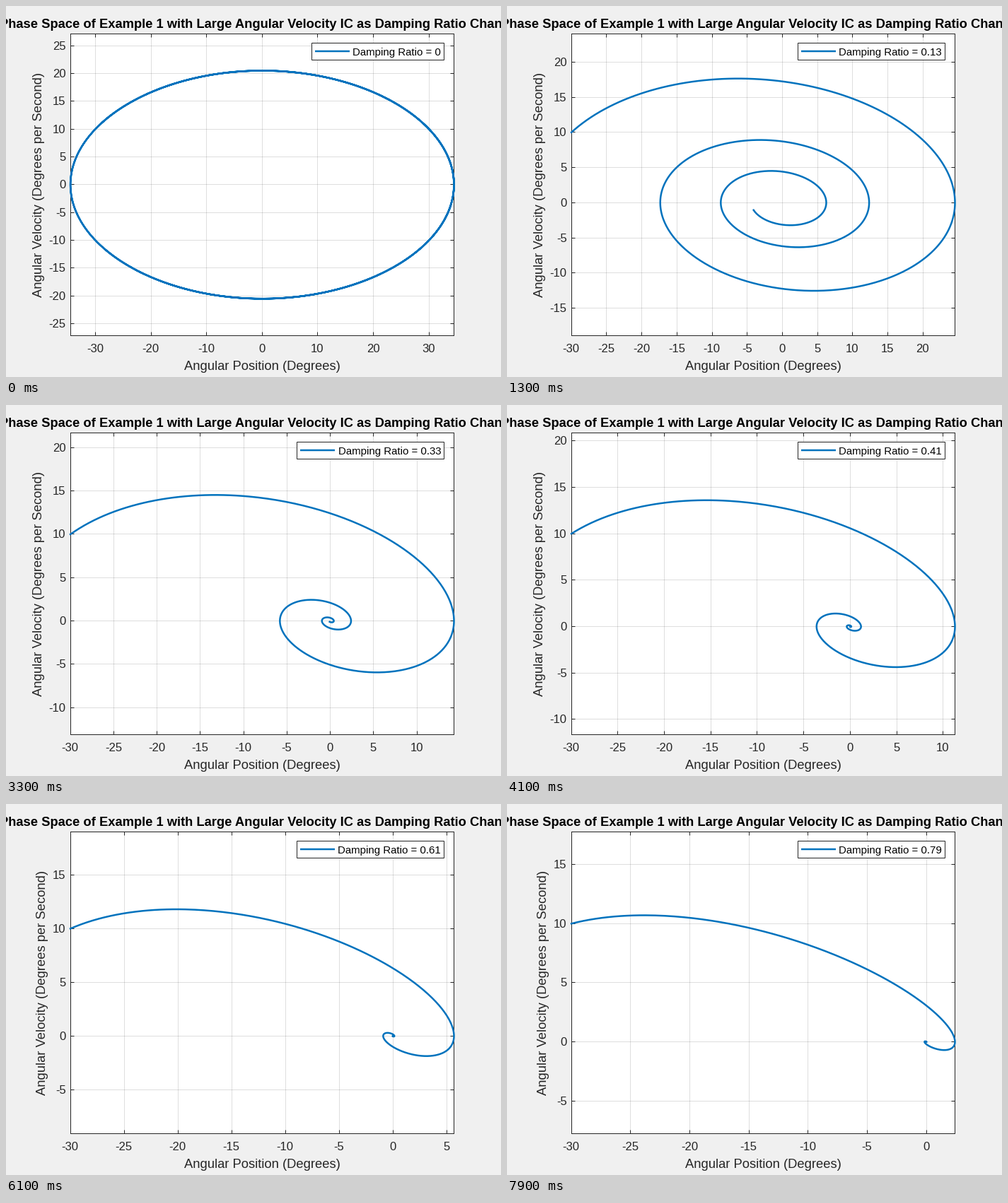
Write a matplotlib script that moves like this. It is 700 by 525 pixels and loops after 8 s.

```python
import numpy as np
import matplotlib.pyplot as plt
from matplotlib.animation import FuncAnimation
from matplotlib.lines import Line2D
from matplotlib.patches import Rectangle
from matplotlib.ticker import FuncFormatter, MultipleLocator
from matplotlib.transforms import Affine2D

W, H, DPI = 700, 525, 100
FRAMES, INTERVAL = 80, 100
LEFT, RIGHT, TOP, BOTTOM = 90.6, 633, 38.6, 466.1   # plot box in pixels
K = 0.365               # gravity over length
T_END, STEPS = 30, 1200
INK, BLUE = "#262626", "#0072BD"
PX = 72 / DPI           # one pixel in points

plt.rcParams["font.family"] = "Liberation Sans"


def slope(state, damping):
    x, v = state
    return np.array([v, -damping * v - K * np.sin(x)])


def integrate(damping):
    """Phase paths of the damped pendulum, one column per damping value."""
    h = T_END / STEPS
    s = np.radians(np.array([np.full_like(damping, -30), np.full_like(damping, 10)]))
    path = [s]
    for _ in range(STEPS):
        a = slope(s, damping)
        b = slope(s + h / 2 * a, damping)
        c = slope(s + h / 2 * b, damping)
        d = slope(s + h * c, damping)
        s = s + h / 6 * (a + 2 * b + 2 * c + d)
        path.append(s)
    return np.degrees(np.array(path))


ratios = np.arange(FRAMES) / 100
paths = integrate(ratios)

fig = plt.figure(figsize=(W / DPI, H / DPI), dpi=DPI, facecolor="#F0F0F0")
ax = fig.add_axes([LEFT / W, 1 - BOTTOM / H, (RIGHT - LEFT) / W, (BOTTOM - TOP) / H])
ax.set_axisbelow(True)
ax.grid(color=INK, alpha=0.15, lw=PX)
ax.tick_params(direction="in", top=True, right=True, length=5.4 * PX, width=PX,
               color=INK, labelcolor=INK, labelsize=16.67 * PX)
ax.tick_params(axis="x", pad=12 * PX)
ax.tick_params(axis="y", pad=6 * PX)
for spine in ax.spines.values():
    spine.set(color=INK, linewidth=PX)
for axis in (ax.xaxis, ax.yaxis):
    axis.set_major_formatter(FuncFormatter(lambda value, _: f"{value:.0f}"))
ax.yaxis.set_major_locator(MultipleLocator(5))

# Half a pixel aligns the smooth curve with the snapped grid
curve, = ax.plot([], [], color=BLUE, lw=2.5 * PX, zorder=3, clip_on=False,
                 transform=ax.transData + Affine2D().translate(0.5, -0.5))


def label(x, y, text, size, **style):
    """Text on the figure, placed in pixels from the top left."""
    style = {"ha": "center", "va": "baseline", "color": INK, **style}
    return fig.text(x / W, 1 - y / H, text, fontsize=size * PX, **style)


label(362.5, 31, "Phase Space of Example 1 with Large Angular Velocity IC "
      "as Damping Ratio Changes", 18.33, weight="bold", color="black")
label(362.75, 515, "Angular Position (Degrees)", 18.33)
y_label = label(50, 252.5, "Angular Velocity (Degrees per Second)", 18.33,
                rotation=90, rotation_mode="anchor")

# Legend, drawn in pixels
box = Rectangle((411, H - 76), 208, 24, fc="white", ec=INK, lw=PX,
                transform=None, zorder=5)
key = Line2D([], [], color=BLUE, lw=2.5 * PX, solid_capstyle="butt",
             transform=None, zorder=6)
fig.add_artist(box)
fig.add_artist(key)
caption = label(615, 70, "", 15, ha="right", color="black", zorder=6)


def update(i):
    x, v = paths[:, 0, i], paths[:, 1, i]
    curve.set_data(x, v)

    # Tight in x, equal scale in y around the middle of the data
    span = np.ptp(x)
    half = span * (BOTTOM - TOP) / (RIGHT - LEFT) / 2
    mid = (v.max() + v.min()) / 2
    ax.set_xlim(x.min(), x.max())
    ax.set_ylim(mid - half, mid + half)
    ax.xaxis.set_major_locator(MultipleLocator(10 if span > 55 else 5))
    y_label.set_x((51 if mid - half <= -10 else 56.5) / W)

    number = f"{ratios[i]:g}"
    caption.set_text(f"Damping Ratio = {number}")
    extra = len(number) - 1
    left = 432.3 - (15 * (0.278 + 0.556 * (extra - 1)) if extra else 0)
    box.set_x(left)
    box.set_width(619 - left)
    key.set_data([left + 4.5, left + 54], [H - 64] * 2)
    return curve, box, key, caption, y_label


anim = FuncAnimation(fig, update, frames=FRAMES, interval=INTERVAL,
                     repeat=True, repeat_delay=0, blit=False)
plt.show()
```
